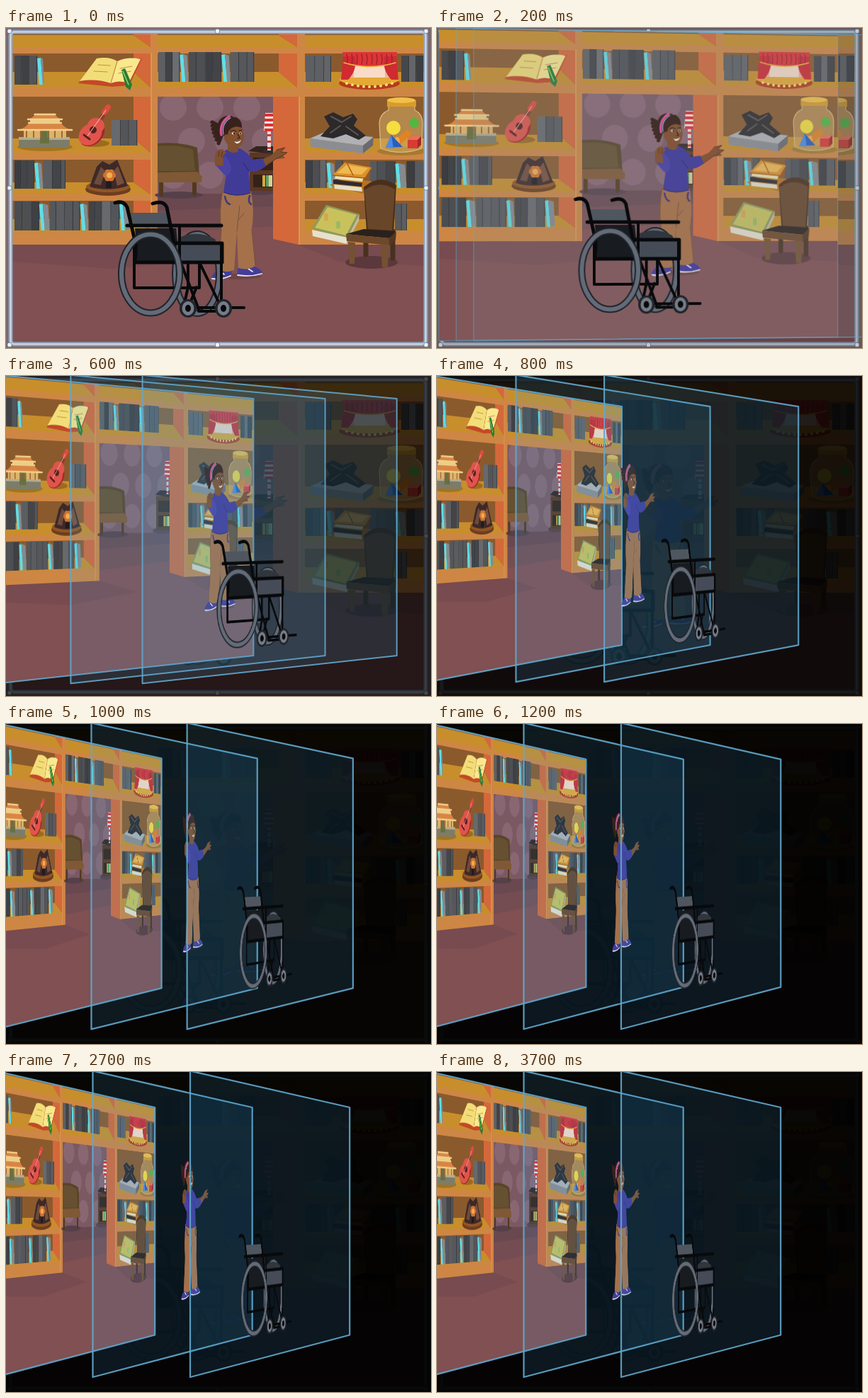
Animation of 600x452 px, one loop 4600 ms. Source, as an HTML page:

```html
<!DOCTYPE html>
<html lang="en">
<head>
<meta charset="utf-8">
<title>Layers of a scene</title>
<style>
html, body { margin: 0; width: 100%; height: 100%; overflow: hidden; background: #000; }
#stage { position: absolute; left: 0; top: 0; width: 600px; height: 452px; overflow: hidden; background: #000; }
#stage > * { position: absolute; left: 0; top: 0; display: block; }
#dark { width: 600px; height: 452px; background: #000; opacity: 0; }
.layer { transform-origin: 0 0; }
</style>
</head>
<body>
<div id="stage"></div>
<script>
// Shape helpers, all returning SVG markup.
const poly = (fill, pts) => `<polygon fill="${fill}" points="${pts}"/>`;
const rect = (fill, x, y, w, h) => `<rect fill="${fill}" x="${x}" y="${y}" width="${w}" height="${h}"/>`;
const oval = (fill, x, y, rx, ry = rx, more = '') => `<ellipse fill="${fill}" cx="${x}" cy="${y}" rx="${rx}" ry="${ry}" ${more}/>`;
const area = (fill, d) => `<path fill="${fill}" d="${d}"/>`;
const line = (stroke, w, d) => `<path fill="none" stroke="${stroke}" stroke-width="${w}" stroke-linecap="round" stroke-linejoin="round" d="${d}"/>`;
const repeat = (n, f) => Array.from({ length: n }, (_, i) => f(i)).join('');

function bay(x0, x1, top, floor, bottom, side) {
  const back = x1 - side;
  return rect('#8a5a2d', x0, top, x1 - x0, bottom - top) +
    poly('#c88e2c', `${x0},${floor} ${back},${floor} ${x1},${bottom} ${x0},${bottom}`) +
    (side ? poly('#d4683a', `${back},${top} ${x1},${top} ${x1},${bottom} ${back},${floor}`) : '');
}

// A row of grey books from x to end; every fifth one leans and shows a bright edge.
function books(x, end, y, h) {
  let seed = x + y, out = '';
  const random = () => { const s = Math.sin(seed++) * 1e4; return s - Math.floor(s); };
  for (let k = 0; x < end - 5; k++) {
    const w = Math.min(9 + random() * 5, end - x), g = 58 + random() * 50 | 0;
    if (k % 5 === 3) {
      out += poly('#5fdfe8', `${x},${y + 4} ${x + 5},${y + 3} ${x + 8},${y + h} ${x + 3},${y + h}`) +
        poly('#838a92', `${x + 5},${y + 3} ${x + w + 1},${y + 5} ${x + w + 3},${y + h - 2} ${x + 8},${y + h}`);
      x += 3;
    } else {
      out += rect(`rgb(${g},${g + 2},${g + 6})`, x, y, w, h) + rect('#35373c', x + w - 1, y, 1, h);
    }
    x += w;
  }
  return out;
}

function openBook() {
  return poly('#c5472a', '102,78 129,42 158,46 192,43 174,81 150,83') +
    area('#f2de78', 'M104 75L128 43Q146 40 157 47L148 78Q126 71 104 75Z') +
    area('#f8e98e', 'M157 47Q172 40 190 44L173 78Q160 73 148 78Z') +
    line('#d08a45', 1.2, 'M157 47L148 78M161 57L178 54M159 64L176 61M130 52L147 53M124 61L143 62') +
    poly('#277b38', '163,59 168,57 178,80 175,88 169,83') + line('#9ed058', 1.5, 'M165 61L173 80');
}

function temple() {
  const roof = (x, y, w, h) => area('#d98543', `M${x} ${y + h}Q${x + w * .15} ${y + h * .7} ${x + w * .2} ${y}H${x + w * .8}Q${x + w * .85} ${y + h * .7} ${x + w} ${y + h}Z`) +
    line('#f3d08a', 2.5, `M${x} ${y + h}H${x + w}M${x + w * .2} ${y}H${x + w * .8}`);
  return oval('#a37322', 55, 168, 39, 6) + rect('#7d7c68', 18, 157, 72, 12) + rect('#b3ab8f', 18, 154, 72, 4) +
    rect('#d9b56a', 25, 143, 60, 12) + rect('#69703f', 48, 145, 13, 18) +
    repeat(6, i => line('#a8623c', 2, `M${29 + i * 10} 144V154`)) +
    roof(17, 134, 76, 10) + rect('#e8cf89', 34, 129, 42, 5) + roof(31, 122, 48, 7);
}

function guitar() {
  return oval('#9b6b20', 126, 163, 20, 5) +
    line('#8c3a32', 6, 'M124 142L141 118') + line('#dd4b41', 8, 'M139 119L144 112') +
    oval('#a4242b', 122, 150, 20, 14, 'transform="rotate(-45 122 150)"') +
    oval('#e0544b', 119, 150, 18, 14, 'transform="rotate(-40 119 150)"') +
    oval('#e0544b', 127, 138, 12, 11) + oval('#5a2024', 123, 144, 5) +
    line('#f3c9a2', 1, 'M114 154L141 116') + line('#5a2024', 3, 'M110 151L118 157');
}

function theatre() {
  return oval('#b5391f', 513, 78, 43, 9) + oval('#e5a935', 513, 73, 42, 8) +
    rect('#f0b59c', 478, 36, 70, 34) + rect('#f8dcc8', 491, 50, 44, 20) +
    area('#dc3536', 'M475 34H552L550 49Q513 60 477 49Z') +
    area('#cf2b31', 'M476 40H493Q496 60 483 73H473Z') + area('#cf2b31', 'M551 40H534Q531 60 544 73H554Z') +
    repeat(10, i => line('#9c2030', 1.3, `M${481 + i * 7} 37Q${483 + i * 7} 44 ${481 + i * 7} 51`)) +
    line('#f0b53b', 1.5, 'M477 49Q513 60 550 49') +
    repeat(9, i => oval('#f7e36a', 481 + i * 8, 83 - (i - 4) ** 2 * .3, 2));
}

function sculpture() {
  return poly('#b0b1b5', '429,156 450,147 519,154 504,166') + poly('#8b8d92', '429,156 504,166 504,177 430,168') +
    poly('#686a70', '504,166 519,154 518,166 504,177') +
    area('#2d292b', 'M444 153L457 139L449 125L462 119L476 126L490 121L496 129L491 138L508 152L498 158L480 150L462 156Z') +
    line('#5b5552', 2, 'M459 125L474 133L487 125M458 148L472 138M480 139L497 151');
}

function jar() {
  return oval('#a67a30', 559, 174, 35, 6) +
    area('#d0a56199', 'M540 109V116Q528 121 527 134L529 170Q557 181 587 170L588 134Q588 121 577 116V109Z') +
    line('#d8bd84', 1.2, 'M540 111V116Q528 121 527 134L529 170Q557 181 587 170L588 134Q588 121 577 116V111') +
    rect('#d99c29', 538, 102, 41, 9) + oval('#f2c04a', 558, 102, 20, 4) +
    oval('#f5de3e', 547, 141, 10) + oval('#55b541', 576, 134, 7) +
    poly('#e08324', '549,157 567,143 573,150 556,165') + oval('#f3ab47', 552, 160, 4, 6) +
    poly('#275ec0', '536,169 544,151 560,168') + poly('#4d8be0', '536,169 544,151 547,170') +
    rect('#d73c32', 567, 158, 14, 12) + poly('#f06b57', '567,158 572,153 586,153 581,158') + poly('#a3272a', '581,158 586,153 586,165 581,170');
}

function hut() {
  return oval('#6d3e1e', 144, 228, 32, 9) + oval('#925523', 144, 224, 31, 8) +
    area('#3d2928', 'M118 224L128 196L136 188L146 193L157 186L172 223Q144 232 118 224Z') +
    poly('#6e4a3b', '124,220 134,196 140,202 134,222') + poly('#774f3d', '152,202 158,195 167,219 157,223') +
    repeat(6, i => oval('#cf7430', 146 + 5 * Math.cos(i * 1.05), 208 + 5 * Math.sin(i * 1.05), 4)) +
    oval('#efb04e', 146, 208, 4) + rect('#211b1e', 141, 217, 8, 9);
}

function stack() {
  return poly('#b87220', '457,222 477,211 518,217 504,234') + poly('#e5dfc8', '463,221 502,225 503,231 464,227') +
    poly('#2c2a30', '462,214 503,219 502,224 462,220') + poly('#efe2b0', '465,208 505,211 503,217 464,213') +
    poly('#dc922b', '461,208 478,190 516,197 507,212') + poly('#f0b851', '467,205 481,193 511,198 502,207') +
    line('#a95a18', 1.5, 'M461 208L507 212L516 198M481 190L490 208');
}

function coverBook() {
  return poly('#8d9a5c', '432,283 452,250 499,263 482,300') + poly('#e6e1cf', '432,285 482,296 481,305 433,294') +
    poly('#bfbca4', '482,296 499,263 498,272 481,305') + poly('#c9c25c', '436,282 454,253 495,264 480,293') +
    repeat(14, i => oval(i % 2 ? '#9cba62' : '#d9a552', 452 + i * 17 % 34, 264 + i * 11 % 21, 3, 2.5));
}

function seat() {
  return oval('#5b383c', 516, 331, 37, 9) +
    line('#49301f', 7, 'M508 289V320M546 287V325') +
    area('#4b2f1c', 'M505 225Q527 205 551 222L547 292L509 288Z') + area('#68462a', 'M506 229Q527 214 549 228L545 286L511 284Z') +
    poly('#2b211c', '480,291 505,284 551,287 541,297') + poly('#6d482a', '480,291 541,297 541,307 481,301') +
    poly('#523621', '541,297 551,288 550,300 541,307') +
    poly('#755131', '483,302 493,303 492,333 485,333') + poly('#755131', '529,306 540,306 539,338 531,338');
}

function room() {
  let s = rect('#805052', 8, 8, 586, 437) + rect('#ce8644', 8, 8, 586, 298);
  // Doorway and what stands behind it.
  s += rect('#7a5963', 214, 97, 163, 209);
  s += repeat(9, i => oval('#886773', 236 + i % 3 * 52 + (i > 2 && i < 6 ? 26 : 0), 112 + Math.floor(i / 3) * 48, 19));
  s += poly('#694850', '214,234 377,234 377,306 214,306') + poly('#744d52', '214,258 377,252 377,306 214,306') +
    poly('#805052', '214,290 377,280 414,306 377,309 214,309');
  s += oval('#55404a', 244, 236, 34, 5) + line('#53391f', 6, 'M266 211V234M219 211V235') +
    area('#574427', 'M214 163Q246 160 270 169L273 209H214Z') + area('#655031', 'M214 167Q242 164 264 172L267 202H214Z') +
    poly('#7f5835', '214,204 270,203 277,210 276,218 214,218');
  s += oval('#553f48', 359, 231, 23, 5) + rect('#5c3720', 344, 176, 34, 54) + rect('#342219', 349, 183, 28, 18) +
    rect('#342219', 349, 207, 28, 18) + poly('#32241f', '342,174 353,167 379,167 377,178') +
    rect('#d3a842', 362, 208, 4, 16) + rect('#61a360', 367, 208, 4, 16) + rect('#d8cf92', 371, 208, 5, 16);
  s += oval('#342b2e', 371, 174, 9, 3) + poly('#f5e8e1', '366,120 377,120 379,145 364,145') + rect('#e6ddd7', 369, 145, 5, 28) +
    repeat(4, i => rect('#dd3031', 365, 121 + i * 7, 13, 4)) + repeat(3, i => rect('#dd3031', 369, 150 + i * 9, 5, 3));

  // Shelves, with one side wall per bay.
  s += rect('#ce8644', 204, 84, 218, 13);
  for (const [x0, x1, side] of [[8, 204, 24], [214, 411, 26], [422, 594, 0]]) {
    s += bay(x0, x1, 8, 10, 27, side) + bay(x0, x1, 36, 62, 84, side);
    if (x0 !== 214) s += bay(x0, x1, 97, 156, 176, side) + bay(x0, x1, 186, 218, 235, side) + bay(x0, x1, 244, 270, 287, side);
  }
  s += poly('#d4683a', '377,97 413,97 413,306 377,298') + rect('#dc9650', 204, 35, 2, 271) + rect('#dc9650', 413, 97, 2, 209);
  s += poly('#774b4f', '8,306 214,306 300,326 150,340 8,330') + poly('#774b4f', '413,306 594,306 594,336 470,330');

  s += books(12, 51, 39, 41) + books(149, 188, 130, 36) + books(12, 84, 187, 40) + books(12, 176, 245, 41) +
    books(215, 352, 34, 42) + books(423, 459, 39, 37) + books(558, 590, 39, 37) +
    books(423, 476, 187, 39) + books(514, 590, 188, 38) + books(549, 566, 248, 38);
  return s + openBook() + temple() + guitar() + theatre() + sculpture() + jar() + hut() + stack() + coverBook() + seat();
}

function girl() {
  const skin = '#80502f', rim = '#4d2d20', hair = '#38221c';
  let s = oval('#3a2020', 326, 351, 34, 4, 'opacity=".25"');
  // Shoes and trousers.
  s += area('#443d98', 'M302 340L320 341L317 350Q302 357 290 353Q291 346 302 340Z') + area('#443d98', 'M328 338L349 336Q361 341 362 346Q344 352 326 348Z') +
    line('#e8e2ef', 1.8, 'M291 354Q304 356 317 350M327 349Q345 352 361 347M303 344L308 348M342 340L348 344');
  s += area('#a5714b', 'M306 229L346 231Q351 259 347 284L352 336Q342 343 328 339L326 287L322 342Q310 347 299 341L304 286Q300 259 306 229Z') +
    line('#76513a', 1, 'M326 287L330 251M306 229Q300 260 304 286L299 341M347 284L352 336M329 270L336 262') +
    line('#3b397e', 2.5, 'M309 238Q311 248 316 249M344 237Q341 246 346 249');
  // Reaching arm.
  s += area(skin, 'M358 187L374 180L382 172L394 169L388 175L397 176L391 180L394 184L381 185L364 197Z') +
    line(rim, .8, 'M382 172L394 169L388 175L397 176L391 180L381 185L364 197');
  s += area('#413b98', 'M308 174Q316 168 330 170Q342 176 348 186L362 184L367 195Q353 206 343 202L345 233Q325 240 307 232L311 206L302 199Z') +
    line('#29275f', 1, 'M343 202L335 191M345 233Q325 240 307 232');
  // Raised arm.
  s += area('#4a43a3', 'M308 180Q316 185 318 199Q315 211 308 207L296 194L304 186Z') +
    area(skin, 'M295 194L295 180Q297 171 305 171L311 176L306 181L307 195Z') + line(rim, .8, 'M301 174L300 181M306 174L304 182');
  // Head.
  s += area(skin, 'M313 162L326 165L328 174Q321 179 313 173Z');
  s += repeat(7, i => line(hair, 5, `M308 142L${291 + i * i * .25} ${133 + i * 5}`));
  s += oval(hair, 314, 138, 15, 14) + area(skin, 'M309 142Q321 132 333 139L336 153Q334 168 326 171Q313 170 309 158Z') +
    area(hair, 'M307 151Q307 126 325 126Q334 131 333 141Q321 136 314 146L312 156Z') +
    line('#d45595', 3.5, 'M304 151Q301 134 315 125') + line('#8dafd4', 1.2, 'M307 150Q304 135 317 127') +
    oval(skin, 311, 155, 3, 5) + oval('#eadfce', 321, 149, 2.4, 1.4) + oval('#eadfce', 331, 149, 1.8, 1.4) +
    oval('#251a18', 322, 149, 1.2) + oval('#251a18', 331, 149, 1.1) +
    line('#2b1b18', 1.2, 'M317 146Q321 143 325 146M329 145L333 144M327 150L330 155L327 156') +
    area('#f3e6dc', 'M322 160Q328 162 332 158Q330 164 325 163Z');
  return s;
}

function wheelchair() {
  const ink = '#08090b', steel = '#636b78';
  const wheel = (x, y, rx, ry, w) => oval('none', x, y, rx, ry, `stroke="#20242a" stroke-width="${w}"`) +
    oval('none', x, y, rx, ry, `stroke="${steel}" stroke-width="${w - 4}"`);
  return wheel(270, 347, 31, 56, 10) +
    area('#30363e', 'M243 297Q268 284 295 298L298 306H242Z') +
    poly('#50565f', '174,261 229,261 235,280 181,281') + poly('#181b1f', '182,283 240,283 245,331 186,331') +
    poly('#454c57', '238,306 304,306 304,330 245,330') +
    line(ink, 5, 'M154 247Q166 243 171 253L183 305V331M207 248Q222 243 227 253L238 308') +
    line(ink, 5, 'M171 279H304M240 304H305V331H184') +
    line(ink, 4, 'M181 306V367H273V332M245 282V331M257 331V366M304 304V394M275 335L304 395M247 332L272 397M257 366L251 393') +
    wheel(204, 347, 41, 55.5, 10) +
    line(ink, 4, 'M270 395H336M272 400H304M259 391L269 366') +
    [257, 307].map(x => oval('#20242a', x, 396, 12, 13) + oval('#757c87', x, 396, 8.5, 10) + oval(ink, x, 396, 4, 5)).join('');
}

function selection() {
  const box = (stroke, w) => `<rect x="6.5" y="5.5" width="586" height="441" rx="5" fill="none" stroke="${stroke}" stroke-width="${w}"/>`;
  let s = box('#8fa3bb', 6) + box('#d5dee8', 2);
  for (const x of [5, 298.5, 593]) for (const y of [4.5, 226, 447.5])
    if (x !== 298.5 || y !== 226) s += `<rect x="${x - 3}" y="${y - 3}" width="6" height="6" rx="2" fill="#eef3f7" stroke="#7189a5"/>`;
  return s;
}

const W = 586, H = 437;
const flat = body => `<svg width="600" height="452" viewBox="0 0 600 452">${body}</svg>`;
const layer = body => `<svg class="layer" width="${W}" height="${H}" viewBox="8 8 ${W} ${H}">${body}</svg>`;
const pane = flat('<polygon class="pane" stroke="#62a8cd" stroke-linejoin="round"/>');
const parts = [room(), girl(), wheelchair()];

const stage = document.getElementById('stage');
stage.innerHTML = flat(rect('#7c686c', 0, 0, 600, 452) + parts.join('') + selection()) +
  '<div id="dark"></div>' + layer(parts[0]) + pane + pane + layer(parts[1]) + pane + layer(parts[2]);
const dark = document.getElementById('dark');
const layers = [...document.querySelectorAll('.layer')];
const panes = [...document.querySelectorAll('.pane')];

const LOOP = 4600, STEP = 100, TURN_TIME = 1300, TURN = 67.4 * Math.PI / 180;

function draw(t) {
  // Soft start, long settle.
  const p = 1 - (1 - Math.min(1, t / TURN_TIME) ** 1.4) ** 3.6;
  const mix = (from, to, power = 1) => from + (to - from) * p ** power;

  const width = W * Math.cos(TURN * p), left = mix(8, -15), gap = mix(0, 137.5, 1.2);
  const topL = mix(8, -1.5, .15), topR = mix(8, 50, 2.2);
  const lowL = mix(445, 431), lowR = mix(445, 371.5, 1.5);
  const near = lowL - topL, k = near / (lowR - topR);
  const shade = mix(0, .96, 1.2), seen = Math.min(1, p * 2);
  const tint = `rgba(${mix(160, 65)},${mix(143, 165)},${mix(135, 220)},${mix(.28, .13) * seen})`;

  dark.style.opacity = shade;
  layers.forEach((el, i) => {
    const x0 = left + gap * i, x1 = x0 + width, edge = panes[i];
    el.style.visibility = edge.style.visibility = t ? 'visible' : 'hidden';
    // Projects the flat picture onto a quad with upright sides.
    el.style.transform = `matrix3d(${[
      (x1 * k - x0) / W, (topR * k - topL) / W, 0, (k - 1) / W,
      0, near / H, 0, 0, 0, 0, 1, 0, x0, topL, 0, 1].map(n => n.toFixed(8))})`;
    edge.setAttribute('points', `${x0},${topL} ${x1},${topR} ${x1},${lowR} ${x0},${lowL}`);
    edge.setAttribute('fill', i ? tint : 'none');
    edge.setAttribute('stroke-width', 1.3 + shade);
    edge.setAttribute('stroke-opacity', .9 * seen);
  });
}

const start = performance.now();
function tick() {
  const t = (performance.now() - start) % LOOP;
  draw(Math.floor(t / STEP) * STEP);
  requestAnimationFrame(tick);
}
tick();
</script>
</body>
</html>
```
